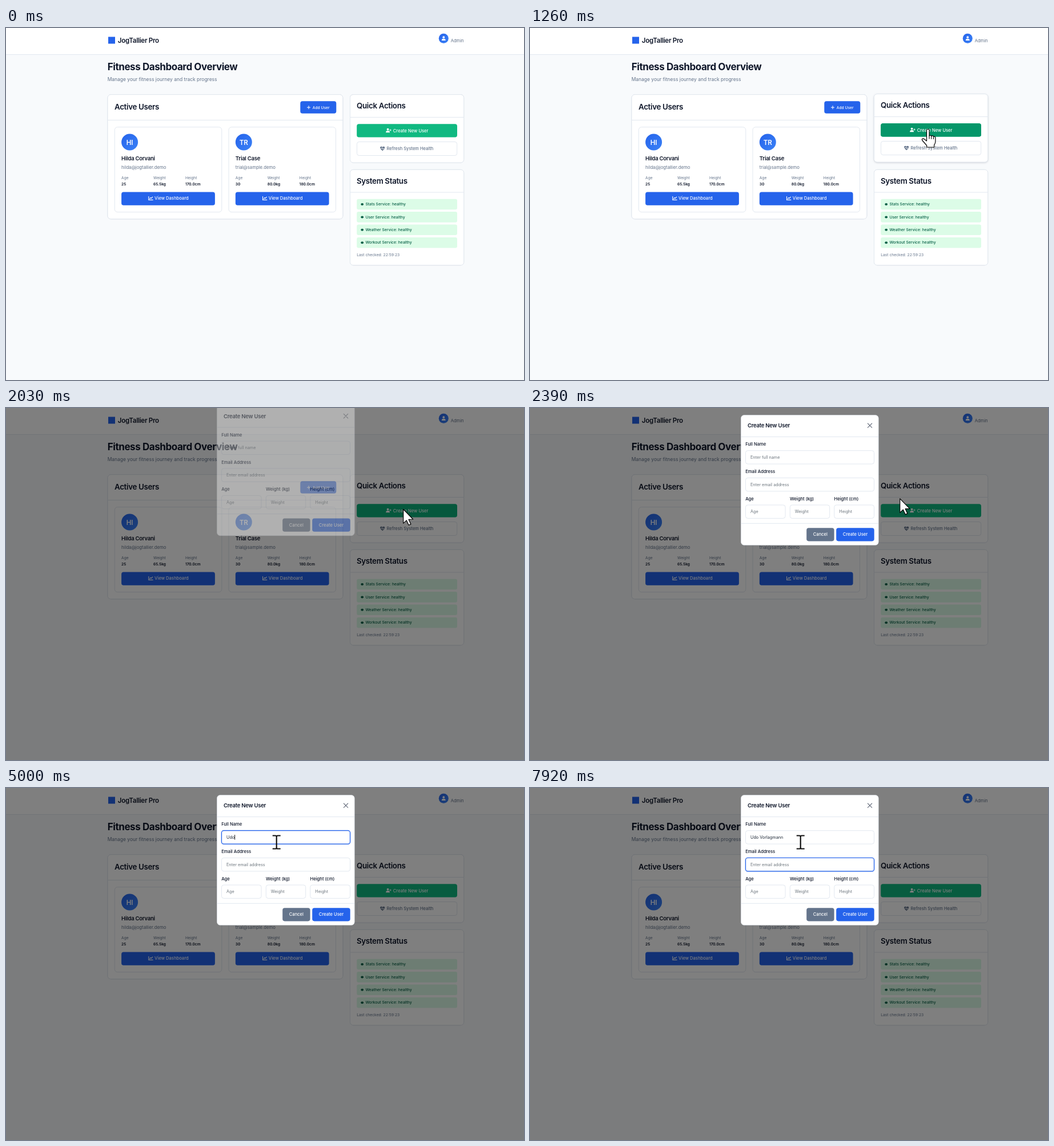
An HTML page that plays this animation: 907x617 px, repeating every 8000 ms.

```html
<!DOCTYPE html>
<html lang="en">
<head>
<meta charset="utf-8">
<title>Dashboard</title>
<style>
html, body { margin: 0; width: 100%; height: 100%; overflow: hidden; background: #f8fafc; }
svg { display: block; width: 907px; height: 617px; }
text { font-family: Inter, sans-serif; white-space: pre; }
.card { filter: drop-shadow(0 .6px .7px rgba(15, 23, 42, .13)); }
.raised { filter: drop-shadow(0 1.8px 1.6px rgba(15, 23, 42, .17)); }
</style>
</head>
<body>
<svg id="stage" viewBox="0 0 907 617"></svg>
<script>
const INK = '#0f172a', MUTED = '#64748b', LINE = '#e2e8f0', BLUE = '#2563eb', GREEN = '#10b981';
const NAME = 'Udo Vorlagmann';
const KEYS = [4290, 4680, 5000, 5300, 5550, 5820, 5870, 6260, 6530, 6530, 6760, 6920, 7070, 7190];
const LOOP = 8000;

// y is the middle of the capitals
const text = (x, y, str, size, weight = 400, fill = INK, extra = '') =>
  `<text x="${x}" y="${y + size * .364}" font-size="${size}" font-weight="${weight}" fill="${fill}" ${extra}>${str}</text>`;
const title = (x, y, str, size, weight = 600) =>
  text(x, y, str, size, weight, INK, `letter-spacing="${-.025 * size}"`);
const box = (x, y, x2, y2, fill, r = 3.8, extra = '') =>
  `<rect x="${x}" y="${y}" width="${x2 - x}" height="${y2 - y}" rx="${r}" fill="${fill}" ${extra}/>`;
const framed = (x, y, x2, y2, r = 3.8, extra = '') =>
  box(x, y, x2, y2, '#fff', r, `stroke="${LINE}" ${extra}`);
const rule = (x, x2, y) => `<path d="M${x} ${y}H${x2}" stroke="${LINE}"/>`;
const icon = (x, y, body) => `<g transform="translate(${x} ${y})">${body}</g>`;

const chartIcon = '<path d="M.7 .5V6.6H8M2.4 4.6L4.2 2.6L5.4 3.8L7.6 1.4" fill="none" stroke="#fff" stroke-width="1.1" stroke-linecap="round" stroke-linejoin="round"/>';
const plusIcon = '<path d="M0 -2.6V2.6M-2.6 0H2.6" stroke="#fff" stroke-width="1" stroke-linecap="round"/>';
const person = '<circle cy="-2" r="1.9" fill="#fff"/><path d="M-3.4 3.7Q-3.4 .5 -.8 .5H.8Q3.4 .5 3.4 3.7Z" fill="#fff"/>';
const heartIcon = `<path d="M0 4L-3.4 .7C-5.8 -2 -2.3 -5.2 0 -2.4C2.3 -5.2 5.8 -2 3.4 .7Z" fill="${MUTED}"/><path d="M-4.5 0H-1.6L-.7 -1.5L.6 1.5L1.5 0H4.5" fill="none" stroke="#fff" stroke-width=".8"/>`;

function userCard(x, initials, name, mail, stats) {
  const labels = ['Age', 'Weight', 'Height'];
  return framed(x, 173.7, x + 187.5, 322.7, 5) +
    `<circle cx="${x + 26.3}" cy="200" r="14.5" fill="url(#avatar)"/>` +
    text(x + 26.3, 200.3, initials, 11.57, 600, '#fff', 'text-anchor="middle"') +
    title(x + 11.8, 228.5, name, 9.5) +
    text(x + 11.8, 243.7, mail, 7.71, 400, MUTED) +
    labels.map((label, i) => text(x + 11.8 + 55.9 * i, 263, label, 6.6, 400, MUTED) +
      text(x + 11.8 + 55.9 * i, 273.5, stats[i], 6.6, 600)).join('') +
    box(x + 11.8, 287.6, x + 175.6, 310.8, BLUE) +
    icon(x + 58.8, 294.8, chartIcon) +
    text(x + 69.8, 298.7, 'View Dashboard', 7.6, 500, '#fff');
}

const page = box(0, 0, 907, 617, '#f8fafc', 0) +
  `<g class="card">${box(0, 0, 907, 46.3, '#fff', 0)}</g>` +
  `<path d="M0 46.5H907" stroke="${LINE}"/>` +
  box(179, 15.5, 191, 27.5, BLUE, 0) +
  title(195.8, 21.8, 'JogTallier Pro', 11.57) +
  `<circle cx="766.3" cy="18.2" r="8.5" fill="url(#avatar)"/>` + icon(766.3, 18.2, person) +
  text(778.7, 21.8, 'Admin', 7.6, 400, MUTED) +
  title(177.7, 68.3, 'Fitness Dashboard Overview', 17, 700) +
  text(177.7, 89.5, 'Manage your fitness journey and track progress', 8.48, 400, MUTED) +
  `<g class="card">${framed(178, 116.7, 589.8, 334.8, 5.5)}</g>` +
  rule(178, 590, 161.5) + title(190, 138.6, 'Active Users', 13.35) +
  box(515.3, 128.3, 578.3, 149.8, BLUE) + icon(530, 139.2, plusIcon) +
  text(536.7, 139.3, 'Add User', 6.7, 500, '#fff') +
  userCard(190.3, 'HI', 'Hilda Corvani', 'hilda@jogtallier.demo', ['25', '65.5kg', '170.0cm']) +
  userCard(390, 'TR', 'Trial Case', 'trial@sample.demo', ['30', '80.0kg', '180.0cm']) +
  `<g id="quick" class="card">${framed(602.5, 116.7, 801.7, 236, 5.5)}` +
  rule(602.5, 801.7, 156.5) + title(614, 136.3, 'Quick Actions', 13.35) +
  box(614.2, 168.3, 790, 191.5, GREEN) + box(614.2, 168.3, 790, 191.5, '#059669', 3.8, 'id="hover"') +
  icon(668.6, 179.6, person) + icon(673, 179, '<path d="M0 -1.7V1.7M-1.7 0H1.7" stroke="#fff" stroke-width=".9"/>') +
  text(677.8, 179.8, 'Create New User', 7.6, 500, '#fff') +
  framed(614.5, 199.5, 789.7, 223.5) + icon(659.2, 211.2, heartIcon) +
  text(666.5, 211.3, 'Refresh System Health', 7.5, 500, MUTED) + '</g>' +
  `<g class="card">${framed(602.5, 248.3, 801.7, 415.8, 5.5)}</g>` +
  rule(602.5, 801.7, 288) + title(614, 268, 'System Status', 13.35) +
  ['Stats', 'User', 'Weather', 'Workout'].map((name, i) => {
    const y = 309 + 22.4 * i;
    return box(614.2, y - 9.3, 790, y + 9.3, '#dcfce7', 3) +
      `<ellipse cx="623.7" cy="${y}" rx="2.4" ry="2" fill="#065f46"/>` +
      text(629.4, y - .3, name + ' Service: healthy', 6.75, 500, '#065f46');
  }).join('') +
  text(614.2, 397.8, 'Last checked: 22:59:23', 6.75, 400, MUTED);

function field(x, x2, y, label, hint, id = '') {
  const ring = id && `<g id="${id}Ring">${box(x - .6, y - .6, x2 + .6, y + 24, 'none', 4.4, `stroke="${BLUE}" stroke-opacity=".18" stroke-width="1.6"`)}` +
    box(x, y, x2, y + 23.4, 'none', 3.8, `stroke="${BLUE}" stroke-width="1.2"`) + '</g>';
  return text(x - .3, y - 11, label, 7.65, 500) + framed(x, y, x2, y + 23.4) + ring +
    text(x + 8.5, y + 11.7, hint, 7.25, 400, '#6c757d', id && `id="${id}Hint"`);
}

const modal = framed(369.5, 12.5, 610.2, 240.3, 5.5, 'stroke-opacity=".6"') +
  title(381, 30.7, 'Create New User', 9.5) +
  '<path d="M591.3 27L598.7 34.4M598.7 27L591.3 34.4" stroke="#6b7280" stroke-width="1.1" stroke-linecap="round"/>' +
  rule(369.8, 610, 50.5) + rule(369.8, 610, 202.3) +
  field(377.5, 602.5, 74.7, 'Full Name', 'Enter full name', 'name') +
  field(377.5, 602.5, 122.5, 'Email Address', 'Enter email address', 'mail') +
  field(377.5, 447, 170, 'Age', 'Age') +
  field(455.3, 524.7, 170, 'Weight (kg)', 'Weight') +
  field(532.8, 602.5, 170, 'Height (cm)', 'Height') +
  text(386, 86.4, '', 7.25, 400, '#1f2937', 'id="typed"') +
  box(0, 0, .9, 8.6, '#000', 0, 'id="caret"') +
  box(484.2, 210.2, 532.6, 233.4, MUTED) + text(508.4, 221.6, 'Cancel', 7.6, 500, '#fff', 'text-anchor="middle"') +
  box(536.2, 210.2, 602.7, 233.4, BLUE) + text(569.5, 221.6, 'Create User', 7.6, 500, '#fff', 'text-anchor="middle"');

const outline = 'fill="#fff" stroke="#000" stroke-width="1.2" stroke-linejoin="round"';
const cursors = `<circle id="click" r="17.3" fill="#ff0" fill-opacity=".65"/>
  <path id="arrow" d="M0 0V24.6L5.6 19.4L9.4 27.8L13.2 26.1L9.4 17.9L17 17.5Z" ${outline}/>
  <g id="hand"><path d="M-1.2 1.5Q1 -2 3.4 1.5V11.5Q5.3 9.8 7.1 12Q9.3 10.4 10.8 12.8Q14 11.8 14.2 15.4V21Q14.2 25 12 27.5V31.5H-1V28.5L-8.8 19.5Q-10.6 16.2 -6.6 16.3L-1.2 20.5Z" ${outline}/>
  <path d="M3.4 11V17M7.1 12V17.3M10.8 12.8V17.5" stroke="#000" stroke-width="1.1"/></g>
  <path id="beam" d="M-7 -11.5H-2Q0 -11.5 0 -9.5Q0 -11.5 2 -11.5H7M-7 11.5H-2Q0 11.5 0 9.5Q0 11.5 2 11.5H7M0 -10V10" fill="none" stroke="#111" stroke-width="2.2"/>`;

const stage = document.getElementById('stage');
stage.innerHTML = `<defs><linearGradient id="avatar" x2="1" y2="1"><stop stop-color="${BLUE}"/><stop offset="1" stop-color="#3b82f6"/></linearGradient></defs>` +
  page + box(0, 0, 907, 617, '#000', 0, 'id="shade"') + `<g id="modal">${modal}</g>` + cursors;

const $ = id => document.getElementById(id);
const set = (id, attr, value) => $(id).setAttribute(attr, value);
const show = (id, on) => set(id, 'opacity', +on);
const clamp = v => v < 0 ? 0 : v > 1 ? 1 : v;
const smooth = p => p * p * (3 - 2 * p);
const within = (t, a, b) => t >= a && t < b;
// n equal jumps, the first at a and the last at b
const jumps = (t, a, b, n) => t < a ? 0 : clamp((Math.floor((t - a) / (b - a) * (n - 1) + 1e-6) + 1) / n);
const bezier = (p, a, b, c, d) => (1 - p) ** 3 * a + 3 * p * (1 - p) ** 2 * b + 3 * p * p * (1 - p) * c + p ** 3 * d;

function pointer(t) {
  if (t < 2190) {
    const p = smooth(jumps(t, 460, 1260, 12));
    return [bezier(p, 868, 885, 850, 695.7), bezier(p, 617, 420, 240, 177.5)];
  }
  const p = smooth(jumps(t, 2190, 2990, 10));
  const drop = 4 * jumps(t, 3600, 3710, 2);
  return [695.7 - 222 * p, 177.5 - 86.5 * p + drop];
}

function render(t) {
  const [x, y] = pointer(t);
  const inside = (x1, y1, x2, y2) => x > x1 && x < x2 && y > y1 && y < y2;
  const open = t >= 1850;
  const over = !open && inside(602, 116, 802, 236);
  const onButton = !open && inside(614, 167, 790, 192);
  const onInput = t >= 2190 && inside(377, 74, 603, 99);
  const hand = onButton || (!open && inside(614, 199, 790, 224));

  const lift = over ? 1 : within(t, 1850, 2030) ? .5 : 0;
  set('quick', 'transform', `translate(0 ${-lift})`);
  set('quick', 'class', over ? 'raised' : 'card');
  show('hover', onButton ? 1 : within(t, 1850, 2030) ? .6 : within(t, 2030, 2190) ? .25 : 0);

  show('shade', !open ? 0 : t < 2030 ? .22 : .5);
  show('modal', t < 2030 ? 0 : t < 2190 ? .38 : 1);
  set('modal', 'transform', `translate(0 ${t < 2190 ? -16.6 : t < 2279 ? -2 : 0})`);

  const typed = NAME.slice(0, KEYS.filter(k => t >= k).length);
  const leave = clamp((t - 7370) / 150);
  $('typed').textContent = typed;
  show('nameHint', !typed);
  show('nameRing', clamp((t - 3040) / 300) * (1 - leave));
  show('mailRing', leave);
  const inMail = t >= 7370;
  show('caret', within(t, 3110, 3650) || within(t, 4290, 7920));
  set('caret', 'x', 386 + (inMail || !typed ? 0 : $('typed').getComputedTextLength()));
  set('caret', 'y', inMail ? 130 : 82);

  const place = `translate(${x} ${y})`;
  ['arrow', 'hand', 'beam'].forEach(id => set(id, 'transform', place));
  show('beam', onInput);
  show('hand', hand);
  show('arrow', t >= 460 && !onInput && !hand);
  show('click', within(t, 1850, 2030) || within(t, 3040, 3320));
  set('click', 'transform', onInput ? `translate(${x - 2.2} ${y - 1})` : place);
}

const start = performance.now();
function frame() {
  render((performance.now() - start) % LOOP);
  requestAnimationFrame(frame);
}
frame();
</script>
</body>
</html>
```
